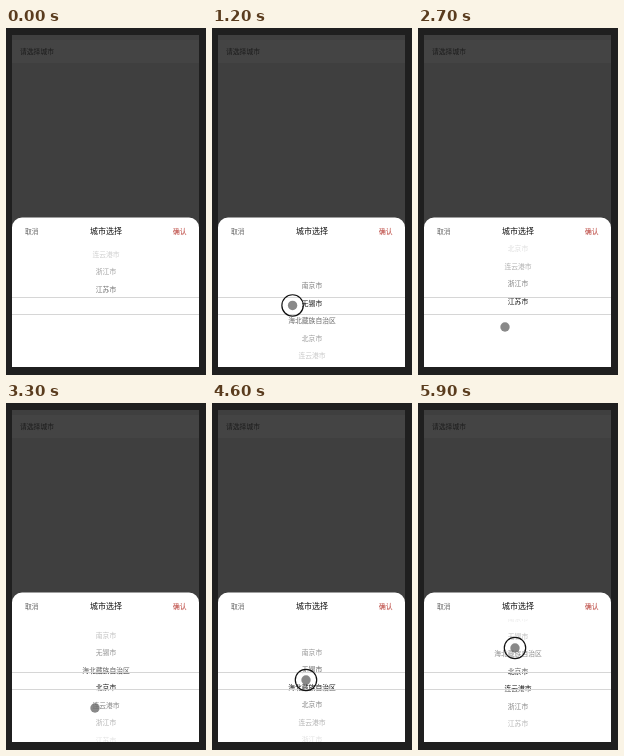
Animation, 200 px wide and 347 px high, one loop 6000 ms. Source, as an HTML page:

```html
<!DOCTYPE html>
<html lang="zh-CN">
<head>
<meta charset="utf-8">
<style>
html, body { margin: 0; width: 100%; height: 100%; overflow: hidden; background: #1f1f1f; }
svg { display: block; width: 100vw; height: 100vh; }
text { font-family: "Noto Sans CJK SC", "Noto Sans CJK", "Noto Sans", sans-serif; font-size: 6.8px; }
.mid { text-anchor: middle; }
</style>
</head>
<body>
<svg viewBox="0 0 200 347" xmlns="http://www.w3.org/2000/svg">
  <defs>
    <clipPath id="outside"><path d="M6 216H193V269H6ZM6 287H193V339H6Z"/></clipPath>
    <clipPath id="inside"><path d="M6 269H193V287H6Z"/></clipPath>
  </defs>
  <rect width="200" height="347" fill="#1f1f1f"/>
  <rect x="6" y="7" width="187" height="332" fill="#3f3f3f"/>
  <rect x="6" y="12" width="187" height="23" fill="#444"/>
  <text x="14" y="26" fill="#1c1c1c">请选择城市</text>
  <path d="M6 339V199.5a10 10 0 0 1 10-10H183a10 10 0 0 1 10 10V339Z" fill="#fff"/>
  <text x="19" y="205.5" fill="#666">取消</text>
  <text class="mid" x="100" y="206" fill="#111" font-weight="500" style="font-size:8px">城市选择</text>
  <text x="167" y="205.5" fill="#b5342c">确认</text>
  <g id="faded" clip-path="url(#outside)"></g>
  <g id="picked" clip-path="url(#inside)"></g>
  <path d="M6 269.5H193M6 286.5H193" stroke="#d6d6d6" stroke-width="1"/>
  <g id="pointer">
    <circle r="4.7" fill="#6c6c6c" fill-opacity=".8"/>
    <circle id="ring" r="10.7" fill="none" stroke="#111" stroke-width="1.2"/>
  </g>
</svg>
<script>
const LOOP = 6000, STEP = 100, ROW = 17.5, CENTER = 278;
const cities = ['南京市', '无锡市', '海北藏族自治区', '北京市', '连云港市', '浙江市', '江苏市'];
const $ = id => document.getElementById(id);

const linear = u => u;
const out = u => 1 - (1 - u) ** 2;
const both = u => u * u * (3 - 2 * u);

// Each key: time, values, easing towards that key
const scroll = [
  [0, [156]], [200, [173], out], [400, [226], linear], [600, [278], out],
  [1050, [278]], [1400, [230], linear], [1800, [172], out], [1900, [173]],
  [2100, [173]], [2450, [156], out], [2700, [168], out], [2800, [173], out],
  [2950, [173]], [3300, [232], linear], [3800, [276], out], [3900, [278], out],
  [4200, [278]], [4600, [249], linear], [5900, [215.5], out]
];
const pointer = [
  [200, [77, 239]], [400, [74, 292], linear], [600, [74, 292]],
  [1050, [78, 298], both], [1400, [84, 250], linear], [1800, [86, 304], both],
  [2100, [86, 304]], [2450, [90, 266], out], [2700, [87, 299], both],
  [2950, [89, 246], both], [3300, [89, 305], linear], [3800, [89, 307], out],
  [4200, [89, 307]], [4600, [94, 277], linear], [5900, [97, 245], out]
];
const presses = [[200, 400], [1050, 1400], [2100, 2450], [2950, 3300], [4200, LOOP]];

function sample(keys, t) {
  const i = keys.findIndex(k => k[0] > t);
  if (i < 0) return keys[keys.length - 1][1];
  if (i === 0) return keys[0][1];
  const [t0, a] = keys[i - 1], [t1, b, ease = linear] = keys[i];
  const u = ease((t - t0) / (t1 - t0));
  return a.map((v, j) => v + (b[j] - v) * u);
}

function makeRows(parent, weight) {
  return cities.map(name => {
    const el = document.createElementNS('http://www.w3.org/2000/svg', 'text');
    el.textContent = name;
    el.setAttribute('class', 'mid');
    el.setAttribute('x', 100);
    el.setAttribute('fill', '#111');
    el.setAttribute('font-weight', weight);
    parent.appendChild(el);
    return el;
  });
}
const faded = makeRows($('faded'), 400), picked = makeRows($('picked'), 500);

function draw(ms) {
  const t = Math.floor((ms % LOOP) / STEP) * STEP;
  const [top] = sample(scroll, t);
  cities.forEach((_, i) => {
    const y = top + i * ROW;
    const alpha = Math.max(0.08, 0.8 - 0.0115 * Math.abs(y - CENTER));
    faded[i].setAttribute('y', y + 2.6);
    faded[i].setAttribute('fill-opacity', alpha);
    picked[i].setAttribute('y', y + 2.6);
  });
  const [x, y] = sample(pointer, t);
  $('pointer').setAttribute('transform', `translate(${x} ${y})`);
  $('pointer').style.display = t < 200 ? 'none' : '';
  $('ring').style.display = presses.some(([a, b]) => t >= a && t < b) ? '' : 'none';
}

const start = performance.now();
function tick() {
  draw(performance.now() - start);
  requestAnimationFrame(tick);
}
draw(0);
requestAnimationFrame(tick);
</script>
</body>
</html>
```
